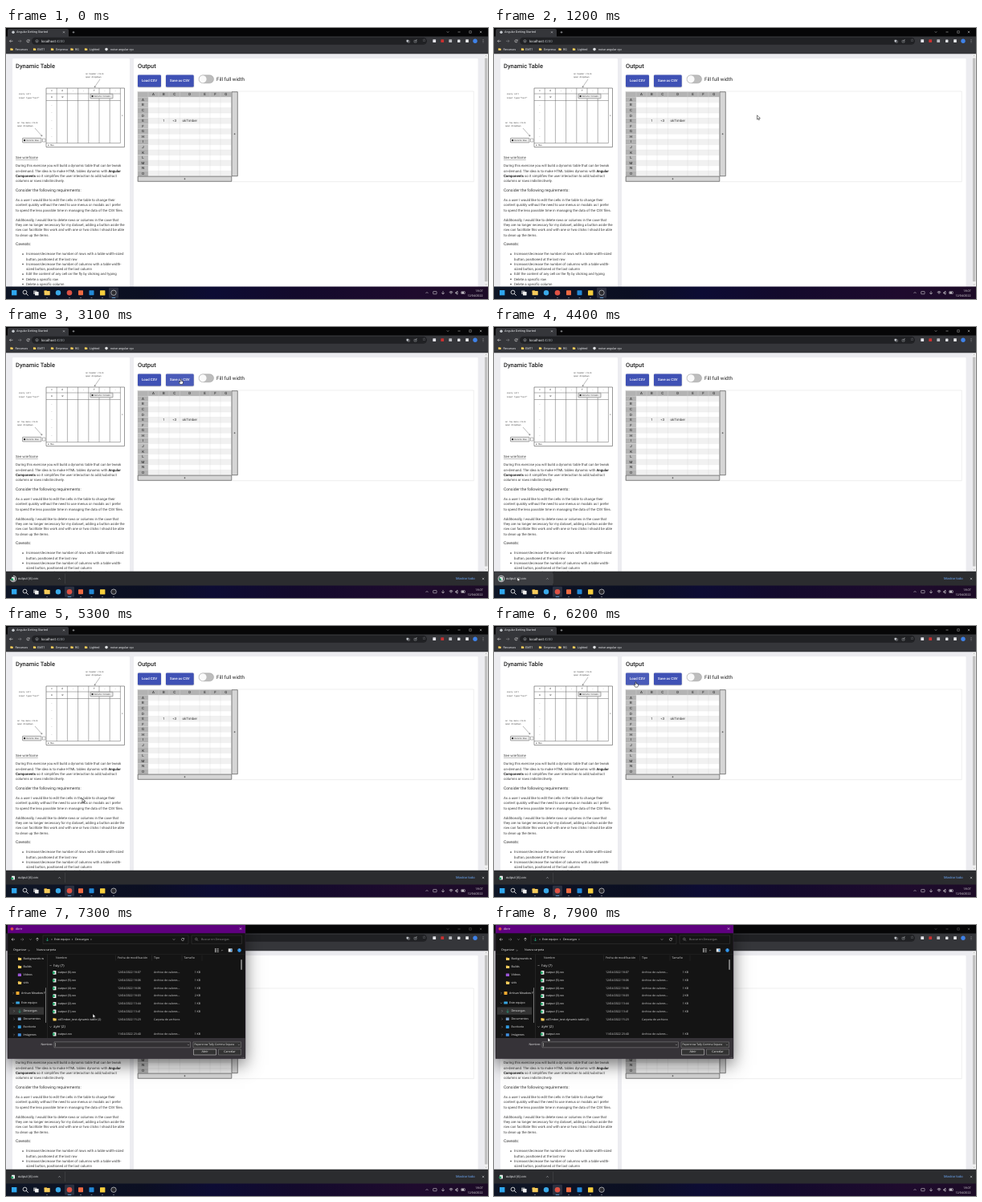
Write an HTML page with a canvas that moves like this. It is 600 by 338 pixels and loops after 8 s.

```html
<!DOCTYPE html>
<html lang="es">
<head>
<meta charset="utf-8">
<title>Dynamic table</title>
<style>
html, body { margin: 0; width: 100%; height: 100%; overflow: hidden; background: #111; }
canvas { display: block; width: 100vw; height: 100vh; }
</style>
</head>
<body>
<canvas id="stage"></canvas>
<script>
const W = 600, H = 338, LOOP = 8000, STEP = 100;
const PAGE_TOP = 32.2, BAR_TOP = 322.5;
const canvas = document.getElementById('stage');
const ctx = canvas.getContext('2d');
const UI = '"Open Sans", sans-serif', PAGE = 'Roboto, sans-serif';
const clamp = v => Math.max(0, Math.min(1, v));
const span = (t, a, b) => clamp((t - a) / (b - a));
const easeOut = p => 1 - (1 - p) ** 3;
const shelfTop = t => BAR_TOP - 17.8 * easeOut(span(t, 2500, 2900));

function rect(x, y, w, h, fill, r = 0) {
  ctx.fillStyle = fill;
  ctx.beginPath();
  ctx.roundRect(x, y, w, h, r);
  ctx.fill();
}
function box(x, y, w, h, stroke, lw = 0.4, r = 0) {
  ctx.strokeStyle = stroke;
  ctx.lineWidth = lw;
  ctx.beginPath();
  ctx.roundRect(x, y, w, h, r);
  ctx.stroke();
}
function line(color, lw, ...p) {
  ctx.strokeStyle = color;
  ctx.lineWidth = lw;
  ctx.beginPath();
  for (let i = 0; i < p.length; i += 2) ctx.lineTo(p[i], p[i + 1]);
  ctx.stroke();
}
function disc(x, y, r, fill) {
  ctx.fillStyle = fill;
  ctx.beginPath();
  ctx.arc(x, y, r, 0, 7);
  ctx.fill();
}
function ring(x, y, r, color, lw = 0.6, from = 0, to = 6.3) {
  ctx.strokeStyle = color;
  ctx.lineWidth = lw;
  ctx.beginPath();
  ctx.arc(x, y, r, from, to);
  ctx.stroke();
}
function shadow(color, blur, dy) {
  ctx.shadowColor = color;
  ctx.shadowBlur = blur * canvas.width / W;
  ctx.shadowOffsetY = dy * canvas.height / H;
}
function text(s, x, y, size, color, o = {}) {
  ctx.font = `${o.weight || 400} ${size}px ${o.font || PAGE}`;
  ctx.textAlign = o.align || 'left';
  ctx.fillStyle = color;
  ctx.fillText(s, x, y);
  return ctx.measureText(s).width;
}
const ui = (s, x, y, color = '#f0f0f0', size = 3.6, align) =>
  text(s, x, y, size, color, { font: UI, align });

function chevron(x, y, dir, color = '#ccc', s = 1.2) {
  const v = { up: [-s, s / 2, 0, -s / 2, s, s / 2], down: [-s, -s / 2, 0, s / 2, s, -s / 2],
              right: [-s / 2, -s, s / 2, 0, -s / 2, s] }[dir];
  line(color, 0.5, ...v.map((n, i) => n + (i % 2 ? y : x)));
}
function arrow(x, y, dx, dy, color) {
  line(color, 0.6, x - dx * 2, y - dy * 2, x + dx * 2, y + dy * 2);
  line(color, 0.6, x + dx * 0.4 + dy * 1.6, y + dy * 0.4 + dx * 1.6, x + dx * 2, y + dy * 2,
       x + dx * 0.4 - dy * 1.6, y + dy * 0.4 - dx * 1.6);
}
function cross(x, y, color, s = 1.2) {
  line(color, 0.5, x - s, y - s, x + s, y + s);
  line(color, 0.5, x + s, y - s, x - s, y + s);
}
function plus(x, y, color, s = 1.2, lw = 0.5) {
  line(color, lw, x - s, y, x + s, y);
  line(color, lw, x, y - s, x, y + s);
}
function folder(x, y, s = 1) {
  rect(x - 2 * s, y - 1.8 * s, 2 * s, 1.5 * s, '#d9a429', 0.3);
  rect(x - 2 * s, y - 1.3 * s, 4.2 * s, 3.1 * s, '#f5cb5c', 0.4);
}
function lens(x, y, r, color) {
  ring(x, y, r, color, r * 0.35);
  line(color, r * 0.4, x + r * 0.7, y + r * 0.7, x + r * 1.7, y + r * 1.7);
}
function reload(x, y, color) {
  ring(x, y, 1.6, color, 0.6, 0.3, 5.4);
  line(color, 0.6, x + 1.7, y - 1.9, x + 1.7, y - 0.5, x + 0.3, y - 0.5);
}

function drawBrowser(t) {
  const focused = t < 6500;
  const ctl = focused ? '#d8d8d8' : '#777';
  rect(0, 0, W, 11, '#060607');
  rect(2, 1, 76, 11, '#35363a', [2, 2, 0, 0]);
  rect(0, 10.5, W, PAGE_TOP - 10.5, '#35363a');
  disc(9, 5.3, 1.7, '#c9cdd2');
  text('Angular Getting Started', 13, 5.3, 3.75, '#e8eaed');
  cross(72, 5.3, '#dadce0', 1);
  plus(84, 5.3, '#dadce0', 1.4);
  chevron(550, 5, 'down', ctl);
  line(ctl, 0.5, 562.5, 5, 565.5, 5);
  box(576.7, 3.7, 2.6, 2.6, ctl);
  cross(591, 5, ctl);

  rect(32, 11.8, 492, 9, '#202124', 4.5);
  arrow(6.5, 16.3, -1, 0, '#e0e0e0');
  arrow(17, 16.3, 1, 0, '#85878a');
  reload(27.5, 16.3, '#e0e0e0');
  ring(38.5, 16.3, 1.6, '#bfc2c6', 0.5);
  line('#bfc2c6', 0.5, 38.5, 16, 38.5, 17.2);
  const w = text('localhost', 44, 16.3, 4.375, '#f1f3f4');
  text(':4200', 44 + w, 16.3, 4.375, '#9aa0a6');
  rect(498.5, 14.8, 2.6, 2.6, '#bdc1c6', 0.3);
  box(500, 15.8, 2.4, 2.4, '#bdc1c6');
  box(508, 15.4, 3, 2.6, '#bdc1c6');
  line('#bdc1c6', 0.5, 509.5, 16.8, 511.5, 14);
  text('☆', 520.5, 16.2, 5, '#bdc1c6', { align: 'center', font: '"DejaVu Sans", sans-serif' });
  rect(531.3, 14.3, 3.8, 3.8, '#e4e4ea', 0.5);
  rect(541.3, 14.3, 3.8, 3.8, '#c93030', 0.5);
  rect(551.3, 14.3, 3.8, 3.8, '#b9bbc0', 0.5);
  rect(562, 14.6, 3.4, 3.4, '#e0e2e6', 0.6);
  rect(572.2, 14.3, 3.6, 3.8, '#eceef0', 0.3);
  disc(584, 16.3, 2.7, '#3f82e8');
  for (const d of [-1.6, 0, 1.6]) disc(594, 16.3 + d, 0.45, '#dadce0');

  [['Recursos', 7, 11.5], ['EMT1', 35.5, 39], ['Empresa', 57.5, 62], ['RG', 82, 86], ['Lighted', 99.5, 104]]
    .forEach(([s, ix, x]) => { folder(ix, 26.6, 0.8); text(s, x, 26.6, 3.75, '#e8eaed'); });
  disc(125, 26.6, 1.8, '#dfe1e4');
  text('noise angular cyc', 130, 26.6, 3.75, '#e8eaed');
}

function drawWireframe() {
  const ink = '#555';
  const note = (s, x, y, size = 3) =>
    text(s, x, y, size, '#333', { font: '"DejaVu Sans Mono", monospace' });
  note('on header click', 99, 57, 2.5);
  note('open dropdown', 99, 61.5, 2.5);
  line(ink, 0.4, 117, 64, 110, 74);
  line(ink, 0.4, 110.6, 72, 110, 74, 112, 73.2);
  box(50, 75, 97.5, 73.5, ink, 0.6);
  for (let i = 1; i < 8; i++) line(ink, 0.45, 50 + i * 13.2, 75, 50 + i * 13.2, 143.5);
  for (const y of [82, 90.5, 143.5]) line(ink, 0.45, 50, y, 142.4, y);
  'xA--Y--'.split('').forEach((c, i) => note(c, 56 + i * 13.2, 78.6));
  note('A', 56, 86.3);
  note('W', 69.5, 86.3);
  for (let y = 96; y < 140; y += 9.7) note('-', 56, y);
  note('+', 144, 109);
  note('⊞ Max', 52, 146.2, 2.7);
  const menu = (s, x, y, w) => {
    rect(x, y, w, 5.6, '#ececec', 0.5);
    box(x, y, w, 5.6, ink, 0.5, 0.5);
    rect(x + 1.6, y + 1.8, 2, 2, '#222');
    note(s, x + 5, y + 2.9, 2.5);
  };
  menu('Delete Column', 105, 82.3, 28);
  menu('Delete Row', 20.5, 137.3, 23.5);
  box(45.5, 138, 3.4, 4, ink, 0.4);
  note('every cell', 16, 82.5, 2.5);
  note('input type="text"', 16, 87, 2.5);
  note('on row menu click', 14, 118, 2.5);
  note('open dropdown', 14, 122.5, 2.5);
  line(ink, 0.4, 36, 125, 45, 135);
  line(ink, 0.4, 42.9, 134.3, 45, 135, 44.6, 132.8);
}

function drawGuide() {
  const body = (rows, x, y) => rows.forEach((s, i) => text(s, x, y + i * 6.25, 4.375, '#3a3a3a'));
  text('Dynamic Table', 12, 48, 7.5, '#222', { weight: 500 });
  drawWireframe();
  const w = text('See wireframe', 12, 161.9, 4.375, '#444');
  line('#444', 0.35, 12, 164.4, 12 + w, 164.4);
  const intro = 'on-demand. The idea is to make HTML tables dynamic with ';
  body(['During this exercise you will build a dynamic table that can be tweak', intro], 12, 172.2);
  const x = 12 + ctx.measureText(intro).width;
  text('Angular', x, 178.45, 4.375, '#222', { weight: 700 });
  const c = text('Components', 12, 184.7, 4.375, '#222', { weight: 700 });
  text(' so it simplifies the user interaction to add/substract', 12 + c, 184.7, 4.375, '#3a3a3a');
  body(['columns or rows indistinctively.'], 12, 190.95);
  text('Consider the following requirements:', 12, 202.4, 5, '#333');
  body(['As a user I would like to edit the cells in the table to change their',
    'content quickly without the need to use menus or modals as I prefer',
    'to spend the less possible time in managing the data of the CSV files.'], 12, 214.9);
  body(['Additionally, I would like to delete rows or columns in the case that',
    'they are no longer necessary for my dataset, adding a button aside the',
    'row can facilitate this work and with one or two clicks I should be able',
    'to clean up the items.'], 12, 239.5);
  text('Caveats:', 12, 270, 5, '#333');
  body(['Increase/decrease the number of rows with a table width-sized',
    'button, positioned at the last row',
    'Increase/decrease the number of columns with a table width-',
    'sized button, positioned at the last column',
    'Edit the content of any cell on the fly by clicking and typing',
    'Delete a specific row', 'Delete a specific column'], 25, 282.1);
  for (const i of [0, 2, 4, 5, 6]) disc(21, 282.1 + i * 6.25, 0.8, '#333');
}

function button(label, x, w, ripple, hover) {
  ctx.save();
  shadow('rgba(0,0,0,.35)', 1.5, 0.6);
  rect(x, 58.5, w, 15, '#3f51b5', 1.3);
  ctx.restore();
  if (hover) rect(x, 58.5, w, 15, 'rgba(255,255,255,.06)', 1.3);
  if (ripple > 0 && ripple < 1) {
    ctx.save();
    ctx.beginPath();
    ctx.rect(x, 58.5, w, 15);
    ctx.clip();
    disc(x + w / 2, 67, 26 * easeOut(ripple), `rgba(255,255,255,${0.18 * (1 - ripple)})`);
    ctx.restore();
  }
  text(label, x + w / 2, 66.1, 4.375, '#fff', { weight: 500, align: 'center' });
}

function drawTable() {
  const cols = [177, 190, 203, 216.5, 241, 254, 267, 280.5];
  const top = 86.3, rh = 6.57, mid = i => (cols[i] + cols[i + 1]) / 2;
  box(163.7, 79, 418.5, 112.7, '#dcdcdc', 0.5);
  rect(164, 79.5, 116.5, 6.8, '#b3b3b3');
  for (let r = 0; r < 15; r++) {
    const y = top + r * rh;
    rect(164, y, 116.5, rh, r % 2 ? '#fff' : '#f1f1f1');
    rect(164, y, 13, rh, r % 2 ? '#bdbdbd' : '#b0b0b0');
    line('#dedede', 0.3, 177, y, 280.5, y);
    text('ABCDEFGHIJKLMNO'[r], 170.5, y + rh / 2, 4.375, '#333', { align: 'center', weight: 500 });
  }
  cols.forEach(x => line('#d8d8d8', 0.35, x, 79.5, x, 184.8));
  for (let i = 0; i < 7; i++) text('ABCDEFG'[i], mid(i), 83, 4.375, '#333', { align: 'center', weight: 500 });
  ['1', '<3', 'okTimber'].forEach((s, i) =>
    text(s, mid(i + 1), top + 4.5 * rh, 4.375, '#333', { align: 'center' }));
  rect(281, 79.7, 7.3, 105, '#d6d6d6');
  box(281, 79.7, 7.3, 105, '#555', 0.7);
  plus(284.6, 132.2, '#333', 1);
  rect(164.2, 185.1, 116.6, 6.2, '#d6d6d6');
  box(164.2, 185.1, 116.6, 6.2, '#555', 0.7);
  plus(222.5, 188.2, '#333', 1);
}

function drawScrollbar(bottom) {
  rect(595.3, PAGE_TOP, 4.7, bottom - PAGE_TOP, '#f1f1f1');
  rect(595.9, PAGE_TOP + 5.3, 3.5, bottom - PAGE_TOP - 11.5, '#c1c1c1');
  chevron(597.6, PAGE_TOP + 2.6, 'up', '#777', 0.9);
  chevron(597.6, bottom - 2.6, 'down', '#777', 0.9);
}

function drawPage(t) {
  rect(0, 31, W, 292, '#ececf0');
  rect(8, 38, 146, 290, '#fff', 1.2);
  rect(159, 38, 428.5, 290, '#fff', 1.2);
  drawScrollbar(shelfTop(t));
  drawGuide();
  text('Output', 164, 48, 7.5, '#222', { weight: 500 });
  button('Load CSV', 164, 29, span(t, 6300, 6900), t >= 5900 && t < 6700);
  button('Save as CSV', 199, 34.7, span(t, 2100, 2800), t >= 1900 && t < 3300);
  rect(240, 58.8, 18.5, 10, '#bdbdbd', 5);
  box(240, 58.8, 18.5, 10, '#8c8c8c', 0.4, 5);
  disc(245, 63.8, 4.6, '#fafafa');
  text('Fill full width', 262, 64, 6.25, '#222');
  drawTable();
}

function drawDownloads(t) {
  const y = shelfTop(t);
  if (y === BAR_TOP) return;
  rect(0, y, W, 18.5, '#2b2c2f');
  if (t >= 3800 && t < 5100) rect(1, y + 0.6, 72, 17, '#3d3e42');
  const c = y + 9.3;
  rect(7, c - 2.2, 4, 4.6, '#f1f3f4', 0.4);
  rect(6.4, c - 0.5, 2.8, 2.6, '#21a366', 0.3);
  if (t < 4900) ring(9, c, 3.8, '#e8eaed', 0.8, -1.57, -1.57 + 6.28 * span(t, 2600, 3300));
  text('output (6).csv', 15, c, 4.1, '#e8eaed');
  chevron(66.5, c, 'up', '#dadce0');
  line('#55565a', 0.4, 73.5, y + 3, 73.5, y + 15.5);
  text('Mostrar todo', 583.5, c, 4.1, '#6ea8f7', { align: 'right' });
  cross(594, c, '#dadce0');
}

function drawTaskbar(t) {
  const g = ctx.createLinearGradient(0, 0, W, 0);
  [[0, '#0f1626'], [0.28, '#0b0f22'], [0.43, '#0d0c34'], [0.6, '#130a2c'], [0.85, '#1f0b2e'], [1, '#1c0b26']]
    .forEach(s => g.addColorStop(...s));
  rect(0, BAR_TOP, W, 15.5, g);
  const active = t < 1900 ? 134 : 79;
  rect(active - 6, 323.8, 12, 13, 'rgba(255,255,255,.13)', 1.2);
  for (const x of [51, 79, 93, 106.5, 120, 134])
    rect(x - (x === active ? 2.4 : 1), 336.3, x === active ? 4.8 : 2, 0.8, x === active ? '#6cb8f5' : '#8d929c', 0.4);
  rect(7, 327, 6.4, 6.4, '#2fa6ee');
  lens(23.5, 329.6, 2.4, '#eee');
  rect(34, 327.5, 4.6, 4.6, '#8d9096', 0.4);
  rect(36, 329, 4.6, 4.4, '#f0f0f0', 0.4);
  folder(51, 330.2, 1.7);
  disc(65, 330.2, 3.2, '#3aa9e8');
  disc(79, 330.2, 3.3, '#dd5144');
  rect(90, 327.2, 6, 6, '#ee6b42', 0.6);
  rect(103.5, 327.2, 6, 6, '#2389d7', 0.6);
  rect(117, 327.2, 6.4, 6.4, '#f7cf3d', 0.6);
  disc(134, 330.2, 3.4, '#2b2b30');
  ring(134, 330.2, 3.2, '#c9ccd2', 0.7);
  const c = '#ececec';
  chevron(524, 330.2, 'up', c, 1.5);
  box(531.7, 328.6, 4.4, 3.2, c, 0.5, 0.4);
  line(c, 0.5, 544, 328, 544, 332.2);
  ring(544, 330, 1.5, c, 0.5, 0, 3.14);
  for (const r of [1.2, 2.3, 3.4]) ring(554, 332, r, c, 0.6, -2.3, -0.84);
  rect(559.5, 329.4, 1.2, 1.8, c);
  line(c, 0.6, 560.5, 329.5, 562, 328.2, 562, 332.3, 560.5, 331.1);
  box(566.7, 328.7, 4.6, 2.8, c, 0.5, 0.4);
  rect(567.3, 329.3, 2.8, 1.6, c);
  ui('18:07', 593.5, 328.1, c, 3.6, 'right');
  ui('12/04/2022', 593.5, 333.6, c, 3.6, 'right');
}

const files = [
  ['output (6).csv', '12/04/2022 18:07', '1 KB'], ['output (5).csv', '12/04/2022 18:06', '1 KB'],
  ['output (4).csv', '12/04/2022 18:06', '1 KB'], ['output (3).csv', '12/04/2022 18:03', '2 KB'],
  ['output (2).csv', '12/04/2022 13:44', '1 KB'], ['output (1).csv', '12/04/2022 13:41', '1 KB'],
  ['okTimber_test-dynamic-table (2)', '12/04/2022 15:23', ''], ['output.csv', '11/04/2022 23:40', '1 KB']
];

function drawSidebar() {
  ctx.save();
  ctx.beginPath();
  ctx.rect(3, 37, 47, 103.5);
  ctx.clip();
  rect(4, 102.6, 43, 9.2, '#343434', 0.6);
  [['Backgrounds w', 42.3], ['Builds', 52.3], ['Videos', 62.2], ['vids', 72.1]].forEach(([s, y], i) => {
    if (i === 2) rect(14.8, y - 1.8, 4.2, 3.6, '#9a55d6', 0.5);
    else folder(17, y);
    ui(s, 21.5, y);
  });
  chevron(9, 85, 'right', '#999');
  rect(12.5, 83, 4, 4, '#f0a92f', 0.5);
  ui('Artisan Meadow F', 19, 85);
  chevron(9, 97.3, 'down', '#999');
  rect(12.3, 95.6, 4.6, 3, '#38a7e4', 0.3);
  ui('Este equipo', 19, 97.3);
  [['Descargas', '#25b58d'], ['Documentos', '#7aa0c8'], ['Escritorio', '#2f9ae0'], ['Imágenes', '#3f8fe0']]
    .forEach(([s, color], i) => {
      const y = 107.3 + i * 9.9;
      chevron(10, y, 'right', '#999');
      if (i) rect(14.8, y - 1.8, 4, 3.6, color, 0.4);
      else arrow(17, y, 0, 1, color);
      ui(s, 21.5, y);
    });
  ctx.restore();
  rect(49, 78, 1, 44, '#777', 0.5);
}

function drawFiles(t) {
  const hover = t < 7000 ? 1 : t >= 7400 && t < 7800 ? 7 : -1;
  [['Nombre', 62], ['Fecha de modificación', 139], ['Tipo', 184], ['Tamaño', 221.5]]
    .forEach(([s, x]) => ui(s, x, 41.4, '#d8d8d8'));
  for (const x of [136.5, 181.5, 219, 244]) line('#3c3c3c', 0.35, x, 37.5, x, 44.5);
  [['hoy (7)', 50.5], ['ayer (2)', 127]].forEach(([s, y]) => {
    chevron(55.5, y, 'down', '#ccc', 1);
    ui(s, 59, y, '#e6e6e6', 4.3);
  });
  files.forEach(([name, date, size], i) => {
    const y = i < 7 ? 59.4 + i * 9.72 : 136.1;
    if (i === hover) rect(53.5, y - 4.7, 189, 9.4, '#4a4a4a');
    if (i === 6) folder(60.5, y);
    else {
      rect(58.6, y - 2.4, 3.8, 4.8, '#f2f2f2', 0.3);
      if (i > 1 || t >= 7000) rect(57.9, y - 1.3, 2.8, 2.8, '#21a366', 0.3);
    }
    ui(name, 64.5, y);
    ui(date, 139, y, '#dcdcdc', 3.55);
    ui(i === 6 ? 'Carpeta de archivos' : 'Archivo de valores...', 184, y, '#dcdcdc', 3.5);
    ui(size, 242, y, '#dcdcdc', 3.5, 'right');
  });
  rect(292.3, 43, 1.5, 13, '#9a9a9a', 0.7);
}

function drawDialog(t) {
  if (t < 6700) return;
  const p = easeOut(span(t, 6600, 7100)), k = 0.85 + 0.15 * p;
  ctx.save();
  ctx.globalAlpha = clamp(p * 1.6);
  ctx.translate(90, 60);
  ctx.scale(k, k);
  ctx.translate(-90, -60);
  shadow('rgba(0,0,0,.55)', 20, 7);
  rect(2, 0, 296, 166.6, '#141414');
  ctx.shadowColor = 'transparent';
  rect(2, 0, 296, 10.2, '#5f007f');
  box(2, 0, 296, 166.6, '#40304a', 0.4);
  disc(7.5, 4.8, 1.9, '#dd5144');
  ui('Abrir', 12, 4.8, '#fff');
  cross(292, 4.6, '#fff');

  arrow(9, 18, -1, 0, '#ddd');
  arrow(20, 18, 1, 0, '#777');
  chevron(30.5, 18, 'down', '#aaa');
  arrow(39, 18, 0, -1, '#ddd');
  box(46, 13, 181, 10.4, '#444');
  arrow(51.5, 18, 0, 1, '#25b58d');
  chevron(57, 18, 'right', '#ccc', 0.9);
  ui('Este equipo', 60, 18);
  chevron(82.5, 18, 'right', '#ccc', 0.9);
  ui('Descargas', 86, 18);
  chevron(106, 18, 'right', '#ccc', 0.9);
  chevron(209, 18, 'down');
  reload(220, 18, '#ccc');
  box(231, 13, 62.5, 10.4, '#444');
  lens(236.8, 17.5, 1.3, '#aaa');
  ui('Buscar en Descargas', 243, 18, '#8c8c8c');

  ui('Organizar', 9, 31.5);
  chevron(28.5, 31.7, 'down', '#ddd', 0.9);
  ui('Nueva carpeta', 38, 31.5);
  for (const y of [29.8, 31.6, 33.4]) {
    rect(260, y - 0.6, 1.3, 1.2, '#ddd');
    line('#ddd', 0.6, 262, y, 265, y);
  }
  chevron(269, 31.7, 'down', '#ccc', 0.9);
  rect(276.8, 29.4, 4.8, 4.2, '#e6e6e6');
  rect(279.6, 30.2, 1.5, 2.6, '#2b8fe6');
  disc(290.5, 31.6, 2.3, '#2b8fe6');
  ui('?', 290.5, 31.6, '#fff', 3.3, 'center');
  line('#2c2c2c', 0.4, 2, 36.5, 298, 36.5);
  line('#3c3c3c', 0.4, 51.5, 36.5, 51.5, 141);
  drawSidebar();
  drawFiles(t);

  rect(2.2, 141, 295.6, 25.4, '#363338');
  ui('Nombre:', 58, 149.2, '#f0f0f0', 3.55, 'right');
  rect(60, 145.8, 169.5, 7, '#323033');
  box(60, 145.8, 169.5, 7, '#a8a8a8');
  line('#fff', 0.4, 61.5, 147, 61.5, 151.6);
  chevron(227, 149.3, 'down', '#ccc', 0.9);
  rect(233, 145.8, 59.5, 7, '#333');
  box(233, 145.8, 59.5, 7, '#9a9a9a');
  ui('Papercrow Tally Comma Separa', 234.5, 149.2, '#f0f0f0', 3.4);
  chevron(290, 149.3, 'down', '#ccc', 0.9);
  [['Abrir', 233.5, '#e0e0e0'], ['Cancelar', 264.5, '#8a8a8a']].forEach(([s, x, edge]) => {
    rect(x, 155, 28, 7, '#333');
    box(x, 155, 28, 7, edge, 0.5);
    ui(s, x + 14, 158.5, '#fff', 3.55, 'center');
  });
  for (const d of [0, 1.3, 2.6]) disc(296.5 - d, 165.3, 0.4, '#999');
  ctx.restore();
}

// time, x, y of the pointer
const path = [
  [500, 597, 215], [900, 440, 150], [1300, 290, 95], [1700, 235, 75], [2000, 217, 65], [3100, 217, 65],
  [3500, 160, 165], [3900, 60, 285], [4200, 29, 312], [4900, 29, 312], [5300, 95, 215], [5700, 172, 102],
  [6000, 176, 70], [6900, 176, 69], [7200, 125, 100], [7500, 74, 132], [7900, 67, 140.5]
];
function pointerAt(t) {
  const i = path.findIndex(k => k[0] > t);
  if (i < 0) return path[path.length - 1].slice(1);
  const [a, b] = [path[i - 1], path[i]], p = span(t, a[0], b[0]);
  return [a[1] + (b[1] - a[1]) * p, a[2] + (b[2] - a[2]) * p];
}
function drawPointer(t) {
  if (t < 500) return;
  const [x, y] = pointerAt(t);
  const hand = (t >= 1900 && t < 3200) || (t >= 5900 && t < 6700);
  const shape = hand
    ? [0, 0, 0.9, 0, 1, 2.2, 3.5, 2.8, 3.5, 4.6, 2.7, 6.4, -0.2, 6.4, -1.9, 3.9, -1.4, 3.3, -0.1, 4]
    : [0, 0, 0, 5.3, 1.2, 4.2, 2, 6, 2.9, 5.6, 2.1, 3.9, 3.8, 3.8];
  ctx.beginPath();
  for (let i = 0; i < shape.length; i += 2) ctx.lineTo(x + shape[i], y + shape[i + 1]);
  ctx.closePath();
  ctx.fillStyle = '#fff';
  ctx.strokeStyle = '#000';
  ctx.lineWidth = 0.5;
  ctx.fill();
  ctx.stroke();
}

function draw(now) {
  const t = Math.floor((now % LOOP) / STEP) * STEP;
  const dpr = window.devicePixelRatio || 1;
  const w = Math.round(innerWidth * dpr), h = Math.round(innerHeight * dpr);
  if (canvas.width !== w || canvas.height !== h) { canvas.width = w; canvas.height = h; }
  ctx.setTransform(w / W, 0, 0, h / H, 0, 0);
  ctx.textBaseline = 'middle';
  ctx.textRendering = 'geometricPrecision';
  drawPage(t);
  drawBrowser(t);
  drawDownloads(t);
  drawTaskbar(t);
  drawDialog(t);
  drawPointer(t);
}
const start = performance.now();
(function tick() {
  draw(performance.now() - start);
  requestAnimationFrame(tick);
})();
</script>
</body>
</html>
```
